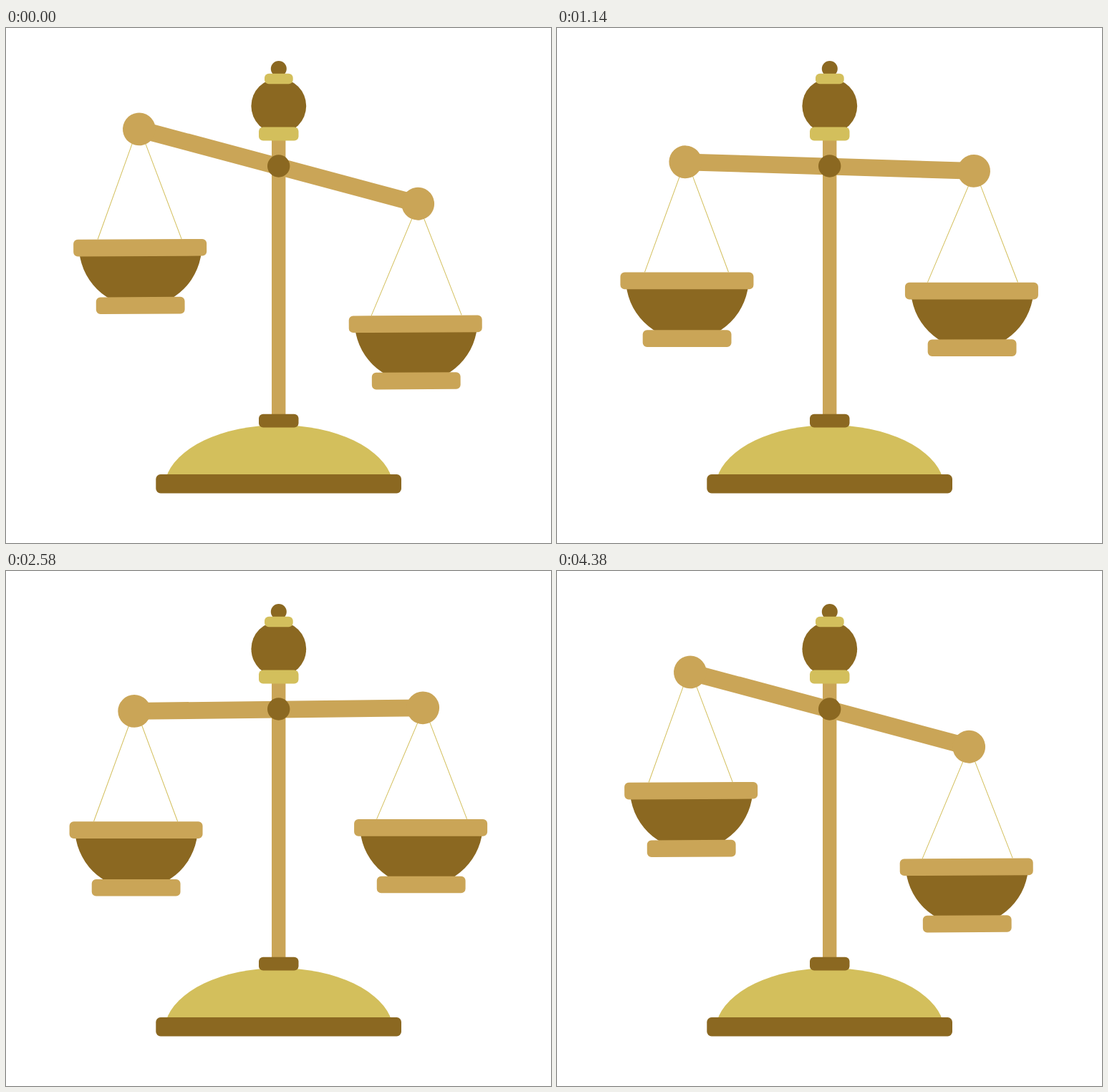
Recreate the animation shown at these times as an HTML page. Size 761 by 720 pixels, loop 6060 ms.

```html
<!DOCTYPE html>
<html lang="en">
<head>
<meta charset="utf-8">
<title>Balance scale</title>
<style>
  html, body { margin: 0; width: 100%; height: 100%; overflow: hidden; background: #fff; }
  svg { display: block; width: 761px; height: 720px; }
  .tan { fill: #caa557; }
  .dark { fill: #8b6821; }
  .gold { fill: #d3bf5c; }
  .cord { fill: none; stroke: #d3bf5c; stroke-width: 1; }
</style>
</head>
<body>
<svg viewBox="0 0 761 720">
  <path class="gold" d="M223 630 A160 89 0 0 1 539 630 Z"/>
  <rect class="dark" x="209.3" y="624" width="342.7" height="26.5" rx="6.5"/>
  <rect class="tan" x="371" y="150" width="19.4" height="396"/>
  <rect class="dark" x="353" y="539.8" width="55.5" height="18.8" rx="6"/>
  <circle class="dark" cx="380.8" cy="57" r="11"/>
  <circle class="dark" cx="380.8" cy="109" r="38.4"/>
  <rect class="gold" x="361" y="63.8" width="39.7" height="14.4" rx="6"/>
  <rect class="gold" x="353" y="138.5" width="55.5" height="19" rx="6"/>

  <g id="left">
    <path class="cord" d="M-59 -12 L-2 -168 M58 -12 L0 -168"/>
    <circle class="dark" cx=".4" cy="-3" r="85.8" clip-path="url(#bowl)"/>
    <rect class="tan" x="-93" y="-11.8" width="186" height="23.7" rx="6"/>
    <rect class="tan" x="-61.8" y="69" width="123.8" height="23.6" rx="6"/>
  </g>
  <g id="right">
    <path class="cord" d="M-61.5 -12 L4.7 -168 M64.5 -12 L4.7 -168"/>
    <circle class="dark" cx=".8" cy="-4" r="85.8" clip-path="url(#bowl)"/>
    <rect class="tan" x="-93" y="-11.8" width="186" height="23.7" rx="6"/>
    <rect class="tan" x="-61.3" y="67.8" width="123.8" height="23.6" rx="6"/>
  </g>
  <clipPath id="bowl"><rect x="-100" y="5" width="200" height="70"/></clipPath>

  <g id="beam">
    <rect class="tan" x="-201.5" y="-11.3" width="403" height="23.8"/>
    <circle class="tan" cx="-201.5" cy=".6" r="22.9"/>
    <circle class="tan" cx="201.5" cy=".6" r="22.9"/>
  </g>
  <circle class="dark" cx="380.7" cy="193" r="15.7"/>
</svg>
<script>
  const TICK = 30, LOOP = 6060, TILT = 15, ARM = 201.5;
  const PIVOT = { x: 380.7, y: 193 };
  const turns = [0, 24, 49, 75, 98, 123, 146]; // ticks at which the beam reverses
  const el = id => document.getElementById(id);
  const beam = el('beam'), left = el('left'), right = el('right');

  // Swing from 1 (right side down) to -1 (left side down), linear between turns
  function swingAt(tick) {
    const i = turns.findIndex(t => t > tick);
    if (i < 0) return 1;
    const u = (tick - turns[i - 1]) / (turns[i] - turns[i - 1]);
    return (i % 2 ? 1 : -1) * (1 - 2 * u);
  }

  function place(node, x, y, angle) {
    node.setAttribute('transform', `translate(${x} ${y}) rotate(${angle})`);
  }

  function draw(now) {
    const s = swingAt(Math.floor(now % LOOP / TICK));
    const a = s * TILT * Math.PI / 180;
    const dx = ARM * Math.cos(a), dy = ARM * Math.sin(a);
    const { x, y } = PIVOT;
    place(beam, x, y, s * TILT);
    place(left, x - dx + 2.3 - 1.2 * s, y + .6 - dy + 166.1 - .4 * s, -.3 * s);
    place(right, x + dx - 3.1 - .5 * s, y + .6 + dy + 167.6 + .4 * s, -.3 * s);
  }

  const start = performance.now();
  function loop() {
    draw(performance.now() - start);
    requestAnimationFrame(loop);
  }
  loop();
</script>
</body>
</html>
```
